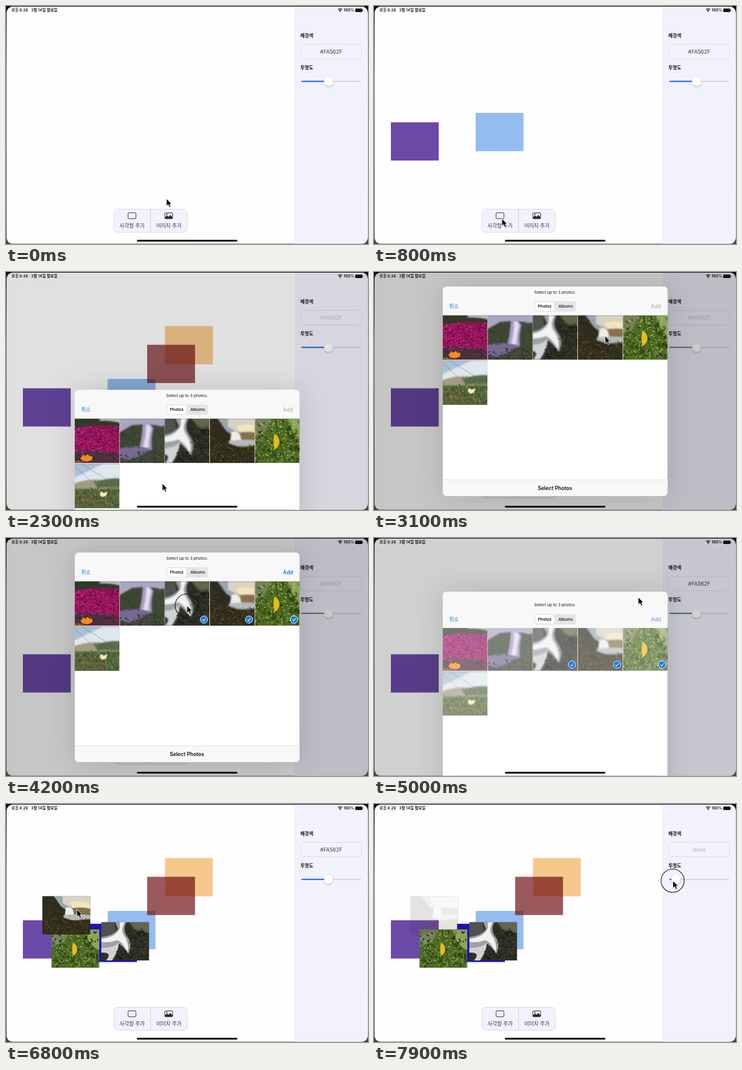
Recreate the animation shown at these times as an HTML page. Size 600 px wide and 394 px high, loop 8 s.

```html
<!DOCTYPE html>
<html lang="ko">
<head>
<meta charset="utf-8">
<title>Canvas editor</title>
<style>
  html, body { margin: 0; width: 100%; height: 100%; overflow: hidden; background: #0c0c0c; }
  svg { display: block; width: 600px; height: 394px; }
  text { font-family: Inter, "Noto Sans CJK KR", "Noto Sans CJK", sans-serif; }
  .mid { text-anchor: middle; }
  .status { font-size: 6.4px; font-weight: 600; fill: #111; }
  .label { font-size: 7.7px; font-weight: 600; fill: #15151a; }
  .action { font-size: 8.6px; fill: #33343f; }
  .small { font-size: 6.7px; fill: #111; }
  .bold { font-weight: 600; }
</style>
</head>
<body>
<svg id="stage" viewBox="0 0 600 394"></svg>
<script>
const LOOP = 8000;
const CELL = 73.8, PITCH = 74.7;
const SHEET_X = 114, SHEET_W = 372.6, SHEET_H = 347, SHEET_TOP = 24;

const clamp = v => Math.max(0, Math.min(1, v));
const span = (t, from, length) => clamp((t - from) / length);
const smooth = p => p * p * (3 - 2 * p);
const easeOut = p => 1 - (1 - p) ** 2;
const easeInOut = p => p < .5 ? 2 * p * p : 1 - 2 * (1 - p) ** 2;

// Seeded scatter of small leaf-like strokes, returned as one path.
function dabs(seed, count, [x0, y0, x1, y1], size, color, lean = 1) {
  const rand = () => (seed = (seed * 16807) % 2147483647) / 2147483647;
  for (let i = 0; i < 5; i++) rand();
  let d = '';
  for (let i = 0; i < count; i++) {
    const x = x0 + rand() * (x1 - x0), y = y0 + rand() * (y1 - y0);
    const dx = (rand() - .5) * 2 * size, dy = (rand() - .3) * size * lean;
    d += `M${x.toFixed(1)} ${y.toFixed(1)}l${dx.toFixed(1)} ${dy.toFixed(1)}`;
  }
  return `<path d="${d}" stroke="${color}" stroke-width="${size * .6}" stroke-linecap="round" fill="none"/>`;
}
const shape = (d, fill, extra = '') => `<path d="${d}" fill="${fill}" ${extra}/>`;
const fill = color => shape('M0 0H80V64H0Z', color);
const hazy = parts => `<g filter="url(#haze)">${parts}</g>`;

const photos = {
  flowers: fill('#8a1552') +
    hazy(shape('M0 0H80V13Q40 4 0 17Z', '#2f3b28') + shape('M44 0H80V8Q62 2 44 3Z', '#b8c2c8') +
      shape('M0 48Q40 40 80 54V64H0Z', '#4c2f3c')) +
    dabs(11, 90, [0, 12, 80, 60], 2.4, '#4b0f35') +
    dabs(12, 190, [0, 11, 80, 48], 2, '#d3178a') +
    dabs(16, 110, [0, 12, 80, 52], 1.3, '#ef45ae') +
    dabs(13, 55, [6, 45, 76, 63], 2, '#31472a') +
    dabs(14, 38, [42, 38, 76, 62], 1.6, '#c42186') +
    shape('M18 55q2-5 5-1q4-5 6 0q6-1 4 5q-7 5-14 1q-5-3-1-5', '#f58a1d') +
    dabs(15, 5, [9, 58, 26, 63], 2, '#e77d18'),
  cascade: fill('#43463d') +
    hazy(shape('M0 0H80V15L62 10L44 8L30 9L8 20L0 24Z', '#aaa6c2') +
      shape('M0 24L26 9L39 10L36 42L0 50Z', '#3b4630') +
      shape('M54 13L80 9V64H58Z', '#3f4934') +
      shape('M41 8Q52 6 56 14Q52 28 54 44Q45 50 35 46Q40 30 41 8Z', '#a89cc4') +
      shape('M46 9Q52 8 53 15Q49 30 49 45H40Q46 28 46 9Z', '#e3dcf0') +
      shape('M8 42Q32 38 52 43Q44 52 22 60L8 56Z', '#766992')) +
    dabs(21, 70, [8, 20, 37, 42], 1.5, '#2c3524') +
    dabs(24, 45, [56, 15, 78, 46], 1.5, '#2e3827') +
    dabs(25, 30, [8, 20, 36, 40], 1.1, '#5c6a44') +
    dabs(22, 75, [34, 48, 76, 63], 1.8, '#252f20') +
    dabs(26, 40, [38, 48, 76, 62], 1.2, '#56643a') +
    dabs(23, 30, [8, 51, 34, 63], 1.6, '#2b2d2c'),
  river: fill('#2f3128') +
    hazy(shape('M0 0H22L26 22L10 32H0Z', '#4d524f') + shape('M46 0H80V18L56 12Z', '#64654e') +
      dabs(31, 50, [46, 12, 78, 60], 3, '#1e2016') +
      shape('M23 0H42Q35 13 43 24Q53 37 45 53Q39 43 30 36Q24 47 0 51V25Q23 22 28 11Z', '#9fa1a2') +
      shape('M31 0H39Q31 14 39 24Q47 36 44 49Q36 34 27 30Q13 35 0 33V28Q25 25 31 10Z', '#f2f2f3') +
      shape('M0 43Q23 43 29 34Q30 46 18 64H8Q20 50 0 51Z', '#d0d2d5')) +
    dabs(32, 55, [46, 8, 78, 58], 1.8, '#5a5b33') +
    dabs(34, 40, [48, 16, 78, 62], 2.2, '#1b1d14') +
    dabs(33, 22, [24, 48, 48, 63], 2.6, '#171914'),
  falls: fill('#38351f') +
    hazy(shape('M0 0H80V33L40 31L0 26Z', '#98a4b0') + shape('M34 0H80V21Q55 25 34 12Z', '#d9d2c2') +
      shape('M46 11Q66 6 80 13V23H52Z', '#f3e4c0') +
      shape('M0 0H19L31 17L42 25L40 35L0 40Z', '#2f2c1d') +
      shape('M46 21Q61 17 80 21V35L44 37Z', '#88704f') +
      shape('M39 20Q46 16 51 23Q52 30 55 35H37Z', '#eeece5') +
      shape('M35 32Q56 29 80 32V38Q57 42 36 39Z', '#b5bbbb') +
      shape('M0 32Q20 27 36 36L54 42L80 40V64H0Z', '#302d1c')) +
    dabs(44, 40, [8, 6, 24, 32], 1.6, '#4a4228') +
    dabs(41, 80, [4, 37, 76, 62], 1.8, '#655529') +
    dabs(42, 75, [4, 39, 76, 63], 2, '#202313') +
    dabs(43, 45, [8, 35, 66, 60], 1.2, '#94602a'),
  plant: fill('#4e6a26') +
    hazy(shape('M0 0H31L22 20L0 30Z', '#76805a') + shape('M55 0H80V35Q63 28 55 0Z', '#8da45a') +
      dabs(51, 60, [2, 2, 78, 62], 3.6, '#263b16', 2)) +
    dabs(52, 80, [2, 2, 78, 62], 2.4, '#83a82f', 2) +
    dabs(53, 45, [3, 2, 77, 58], 1.7, '#c6d982', 2) +
    dabs(54, 45, [2, 14, 78, 63], 2.4, '#1f3010', 2) +
    shape('M38 0L41 22L51 62', 'none', 'stroke="#314b1c" stroke-width="1.2"') +
    shape('M36 22Q44 26 43 35Q41 42 36 45Q33 32 36 22Z', '#e3bd18'),
  beach: fill('#586a3d') +
    hazy(shape('M0 0H80V30L52 24L0 31Z', '#dfe7ee') + shape('M0 0H50L8 20H0Z', '#a9c0d6') +
      shape('M8 28Q35 19 58 25L80 20V36H8Z', '#a39b82') + shape('M36 27Q58 18 80 22V34H40Z', '#5c6d48')) +
    shape('M6 2L30 24M18 0L54 23', 'none', 'stroke="#67717a" stroke-width=".5"') +
    dabs(64, 45, [36, 25, 76, 36], 1.3, '#465636', 2) +
    dabs(61, 100, [4, 37, 76, 63], 2, '#374c27', -3) +
    dabs(62, 80, [5, 34, 76, 60], 1.2, '#97a266', -3) +
    dabs(63, 50, [7, 46, 55, 63], 1.5, '#8b352e', -2) +
    shape('M45 40l5 2l5-2l-2 6l-5 2l-4-3Z', '#f2ebba')
};
const names = Object.keys(photos);
const symbols = names.map(n =>
  `<symbol id="${n}" viewBox="0 0 80 64" preserveAspectRatio="xMidYMid slice">${photos[n]}</symbol>`).join('');

const rects = [
  { at: 350, x: 28, y: 192.5, fill: '#6b49a7' },
  { at: 600, x: 168.5, y: 177, fill: '#93bdf0' },
  { at: 850, x: 137.7, y: 198.3, fill: '#1f10b8' },
  { at: 1050, x: 263.5, y: 89.5, fill: '#f5c88d' },
  { at: 1250, x: 234, y: 120.5, fill: 'rgba(104,3,10,.65)' }
];
const images = [
  { at: 5700, name: 'plant', x: 115, y: 239.3 },
  { at: 5950, name: 'falls', x: 100, y: 184.2 },
  { at: 6200, name: 'river', x: 197.6, y: 227.3 }
];
// Picker column and the time it is ticked.
const ticks = [[4, 3400], [3, 3800], [2, 4200]];
const SELECT_AT = 6950, DRAG_AT = 7560;

// time, x, y of the pointer tip
const path = [
  [0, 266, 319], [300, 212, 352], [1280, 212, 352], [1500, 257, 350], [1900, 259, 350],
  [2650, 259, 350], [3100, 383, 106], [3350, 448, 110], [3520, 448, 110], [3750, 375, 112],
  [3920, 375, 112], [4150, 300, 112], [4300, 300, 112], [4640, 466, 58], [4780, 466, 58],
  [5000, 438, 98], [5400, 373, 141], [6250, 373, 141], [6880, 106, 176], [7060, 106, 176],
  [7500, 575, 127], [7600, 575, 127], [7900, 495.5, 127], [LOOP, 495.5, 127]
];
const presses = [350, 600, 850, 1050, 1250, 1700, 3400, 3800, 4200, 4680, SELECT_AT];

function pointerAt(t) {
  const i = path.findIndex(k => k[0] > t);
  const [t0, x0, y0] = path[i - 1], [t1, x1, y1] = path[i];
  const p = smooth((t - t0) / (t1 - t0));
  return [x0 + (x1 - x0) * p, y0 + (y1 - y0) * p];
}

const cells = names.map((n, i) =>
  `<use href="#${n}" x="${SHEET_X + i % 5 * PITCH}" y="${47.5 + Math.floor(i / 5) * PITCH}" width="${CELL}" height="${CELL}"/>`).join('');
const marks = ticks.map(([col]) =>
  `<g class="tick" transform="translate(${SHEET_X + col * PITCH + 64.7} 111)">
    <circle r="6" fill="#1673e6" stroke="#fff"/>
    <path d="M-2.6 .2L-.7 2.4L2.7-2.3" fill="none" stroke="#fff" stroke-width="1.1"/></g>`).join('');

document.getElementById('stage').innerHTML = `
<defs>
  <linearGradient id="desk" x2="0" y2="1"><stop stop-color="#0c0c0c"/><stop offset=".3" stop-color="#6f675a"/><stop offset="1" stop-color="#4c4433"/></linearGradient>
  <clipPath id="screen"><rect x="1" y="1" width="598.6" height="392.6" rx="10"/></clipPath>
  <clipPath id="card"><rect x="${SHEET_X}" width="${SHEET_W}" height="${SHEET_H}" rx="7"/></clipPath>
  <filter id="soft" x="-30%" y="-30%" width="160%" height="160%"><feGaussianBlur stdDeviation="24"/></filter>
  <filter id="haze"><feGaussianBlur stdDeviation=".8"/></filter>
  <filter id="lift" x="-60%" y="-60%" width="220%" height="220%"><feDropShadow dx="0" dy="1.5" stdDeviation="1.8" flood-opacity=".25"/></filter>
  ${symbols}
</defs>
<rect width="600" height="394" fill="url(#desk)"/>
<path d="M0 0H600V1H0Z" fill="#0c0c0c"/>
<g clip-path="url(#screen)">
  <rect width="600" height="394" fill="#fefefe"/>
  ${rects.map(r => `<rect class="box" x="${r.x}" y="${r.y}" width="79.3" height="63.3" fill="${r.fill}"/>`).join('')}
  ${images.map(m => `<g class="image"><use href="#${m.name}" x="-39.7" y="-31.7" width="79.4" height="63.4"/>
    <rect class="frame" x="-39.4" y="-31.4" width="78.8" height="62.8" fill="none"/></g>`).join('')}

  <rect x="178.8" y="336.4" width="121.4" height="38.2" rx="6" fill="#f2f2fc" stroke="#d3d3e2" stroke-width=".8"/>
  <path d="M239.5 336.4V374.6" stroke="#cacadb" stroke-width=".9"/>
  <rect x="202.3" y="342.5" width="13" height="9.6" rx="1.2" fill="none" stroke="#30324a"/>
  <rect x="263.3" y="342.5" width="12.8" height="9.6" rx="1.2" fill="none" stroke="#252638"/>
  <path d="M263.5 350L267 346.8L269.5 349L272.2 345.9L276 349.8V352H263.5Z" fill="#252638"/>
  <circle cx="266.6" cy="345.2" r="1.1" fill="#252638"/>
  <text class="action mid" x="209" y="366.9">사각형 추가</text>
  <text class="action mid" x="270" y="366.9">이미지 추가</text>

  <rect x="478" width="122" height="394" fill="#f2f2fd"/>
  <text class="label" x="488" y="51.9">배경색</text>
  <rect x="488.4" y="63.8" width="101.2" height="23.4" rx="5.5" fill="#f3f3fd" stroke="#d9d9e6" stroke-width=".8"/>
  <text id="color" class="action mid" x="539" y="78.6"></text>
  <text class="label" x="488" y="104.7">투명도</text>
  <path d="M490.5 124.8H587.5" stroke="#d3d3dd" stroke-width="1.9" stroke-linecap="round"/>
  <path id="track" stroke-width="1.9" stroke-linecap="round"/>
  <circle id="thumb" cy="124.8" r="7.4" fill="#fff" filter="url(#lift)"/>

  <text class="status" x="9" y="9.3">오후 6:26</text>
  <text class="status" x="41.5" y="9.3">3월 14일 월요일</text>
  <path d="M550.2 5.9Q553.8 2.9 557.4 5.9M551.6 7.5Q553.8 5.7 556 7.5" fill="none" stroke="#111" stroke-width="1.1"/>
  <circle cx="553.8" cy="9" r=".9" fill="#111"/>
  <text class="status" x="559.6" y="9.3">100%</text>
  <rect x="578.8" y="4.2" width="12" height="5.8" rx="1.6" fill="#111"/>
  <path d="M591.8 6V8.2" stroke="#555" stroke-width=".8"/>

  <rect id="dim" width="600" height="394" fill="#000"/>
  <g id="sheet">
    <rect x="${SHEET_X}" width="${SHEET_W}" height="${SHEET_H}" fill="#000" opacity=".14" filter="url(#soft)"/>
    <g clip-path="url(#card)">
      <rect x="${SHEET_X}" width="${SHEET_W}" height="${SHEET_H}" fill="#fff"/>
      <g id="grid"><g id="pics">${cells}</g>${marks}</g>
      <rect id="bar" x="${SHEET_X}" width="${SHEET_W}" fill="#f8f8f8"/>
      <g id="head">
        <text class="small mid" x="300" y="11.7">Select up to 3 photos.</text>
        <rect x="265.8" y="24.3" width="68.8" height="17.2" rx="4" fill="#e5e5e9"/>
        <rect x="267" y="25.4" width="32.2" height="15" rx="3.4" fill="#fff" stroke="#d9d9dd" stroke-width=".4"/>
        <text class="small mid bold" x="283" y="35.4">Photos</text>
        <text class="small mid" x="317.7" y="35.4" font-weight="500">Albums</text>
        <text class="action" x="124.4" y="36.4" font-weight="500" style="fill:#1479f0">취소</text>
        <text id="add" class="action mid bold" x="467.5" y="36.1">Add</text>
      </g>
      <rect x="${SHEET_X}" y="320" width="${SHEET_W}" height="27" fill="#f8f8f8"/>
      <path d="M${SHEET_X} 320h${SHEET_W}" stroke="#d4d4d6" stroke-width=".7"/>
      <text class="action mid bold" x="300" y="336.7" style="fill:#111">Select Photos</text>
    </g>
  </g>
  <rect x="217" y="387" width="166.5" height="3" rx="1.5" fill="#050505"/>
</g>
<circle id="ring" r="19.2" fill="none" stroke="#111" stroke-width="1.1"/>
<path id="pointer" d="M0 0V12.2L2.8 9.7L4.9 14.2L7.1 13.2L5.1 8.9H8.7Z" fill="#000" stroke="#fff" stroke-width=".8"/>`;

const $ = id => document.getElementById(id);
const all = name => [...document.querySelectorAll('.' + name)];
const set = (el, attrs) => { for (const k in attrs) el.setAttribute(k, attrs[k]); };
const show = (el, on) => set(el, { visibility: on ? 'visible' : 'hidden' });
const boxes = all('box'), imageEls = all('image'), frames = all('frame'), tickEls = all('tick');

function drawSheet(t) {
  const leave = easeInOut(span(t, 4800, 680));
  const up = easeOut(span(t, 2100, 628)) * (1 - leave);
  const fade = span(t, 4800, 180);
  const grow = 13 * fade;
  show($('sheet'), up > 0);
  set($('sheet'), { transform: `translate(0 ${394 - (394 - SHEET_TOP) * up})` });
  set($('dim'), { opacity: .22 * up });
  set($('grid'), { transform: `translate(0 ${grow * .77})` });
  set($('pics'), { opacity: 1 - .32 * fade });
  set($('bar'), { height: 47.3 + grow });
  set($('head'), { transform: `translate(0 ${grow})` });
  $('add').style.fill = t < ticks[0][1] ? '#b9b9bd' : '#1479f0';
  set($('add'), { opacity: 1 - .45 * fade });
  tickEls.forEach((el, i) => show(el, up > 0 && t >= ticks[i][1]));
}

function drawPanel(t, tipX) {
  const picked = t >= SELECT_AT;
  const muted = span(t, 2100, 200) * (1 - span(t, 4800, 200));
  const grey = span(t, 2100, 900) * (1 - span(t, 4850, 500));
  const x = !picked ? 534.5 : t < 7600 ? 580 : tipX + 5;
  $('color').textContent = picked ? 'None' : '#FA562F';
  $('color').style.fill = picked ? '#b4b4be' : '#3a3b45';
  set($('color'), { opacity: 1 - .72 * muted });
  set($('thumb'), { cx: x });
  set($('track'), {
    d: `M490.5 124.8H${Math.max(491, x - 6)}`,
    stroke: `rgb(${22 + 98 * grey},${104 + 18 * grey},${240 - 104 * grey})`
  });
  return picked ? .1 + .9 * clamp((x - 498) / 82) : 1;
}

function update(t) {
  const [x, y] = pointerAt(t);
  boxes.forEach((el, i) => show(el, t >= rects[i].at));
  drawSheet(t);
  const alpha = drawPanel(t, x);
  images.forEach((m, i) => {
    const selected = m.name === 'falls' && t >= SELECT_AT;
    const scale = 1 + .45 * (1 - span(t, m.at, 300)) ** 2;
    show(imageEls[i], t >= m.at);
    set(imageEls[i], { transform: `translate(${m.x} ${m.y}) scale(${scale})`, opacity: selected ? alpha : 1 });
    set(frames[i], { stroke: selected ? '#3a3ad0' : 'none' });
  });
  set($('pointer'), { transform: `translate(${x} ${y})` });
  set($('ring'), { cx: x - .5, cy: y });
  show($('ring'), t >= DRAG_AT || presses.some(p => t >= p - 40 && t < p + 80));
}

function tick(now) {
  update(now % LOOP);
  requestAnimationFrame(tick);
}
update(0);
requestAnimationFrame(tick);
</script>
</body>
</html>
```
